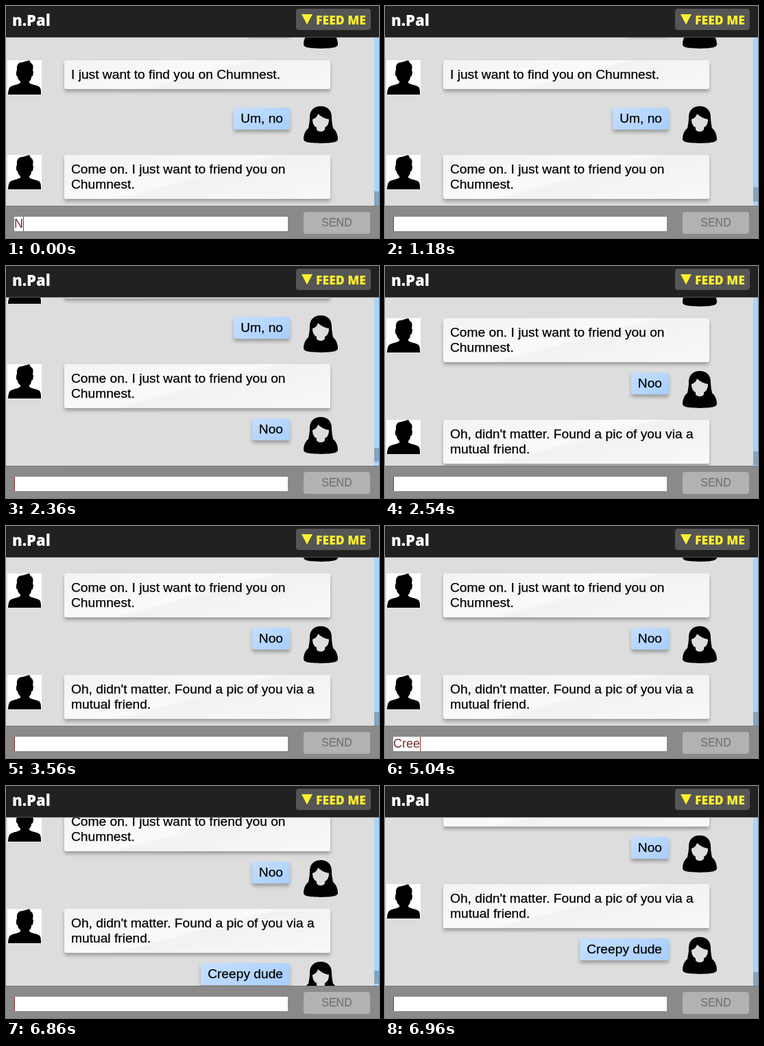
Animation, 544 px wide and 338 px high, one loop 6.98 s. Source, as an HTML page:

```html
<!DOCTYPE html>
<html lang="en">
<head>
<meta charset="utf-8">
<title>Chat</title>
<style>
html, body { margin: 0; width: 100%; height: 100%; overflow: hidden; }
#stage { position: relative; width: 544px; height: 338px; overflow: hidden; background: #ddd;
  font-family: "Liberation Sans", Arial, sans-serif; }
#stage * { position: absolute; box-sizing: border-box; white-space: nowrap; }
#chat { left: 0; top: 45px; width: 544px; height: 246px; overflow: hidden; }
#log { left: 0; top: -45px; width: 537px; height: 700px; }
#track { left: 537px; top: 0; width: 7px; height: 246px; background: #a8d4fc; }
#thumb { left: 0; width: 7px; background: #80a5c4; }
#stage .bubble { border-radius: 3px; font-size: 19.2px; line-height: 22px; color: #000;
  -webkit-text-stroke: .25px; box-shadow: 0 4px 5px rgba(0, 0, 0, .28); }
#stage .bot { left: 85px; width: 388px; padding: 10px; white-space: normal;
  background: linear-gradient(165deg, #f3f3f3, #fafafa 48%, #f2f2f2 52%, #f8f8f8); }
#stage .me { right: 123px; padding: 5px 10px;
  background: linear-gradient(150deg, #c6dffe, #a6cefe); }
header { left: 0; top: 0; width: 544px; height: 45px; background: #212121; box-shadow: 0 1px 0 #555; }
header * { font: 800 22px/30px "Open Sans", sans-serif; }
#name { left: 9px; top: 5px; color: #fff; }
#feed { left: 423px; top: 4px; width: 109px; height: 31px; border-radius: 4px; background: #555; }
#feed span { left: 29px; top: 1px; font-size: 17.6px; color: #fff030; }
#feed svg { left: 8px; top: 8px; fill: #fff030; }
footer { left: 0; top: 291px; width: 544px; height: 47px; background: #8a8a8a; border-top: 1px solid #777; }
#field { left: 12px; top: 15px; width: 399px; height: 21px; background: #fff; }
#typed { left: 0; top: 0; height: 21px; font-size: 18px; line-height: 21px; color: #703434; }
#stage #text { position: static; white-space: pre; }
#caret { right: -1px; top: 0; width: 1px; height: 21px; background: #8a3030; }
#send { left: 434px; top: 8px; width: 97px; height: 32px; border-radius: 4px; background: #b2b2b2;
  color: #777; font-size: 16px; line-height: 32px; text-align: center; -webkit-text-stroke: .3px; }
</style>
</head>
<body>
<div id="stage">
  <div id="chat">
    <div id="log"></div>
    <div id="track"><div id="thumb"></div></div>
  </div>
  <header>
    <div id="name">n.Pal</div>
    <div id="feed"><svg width="16" height="15"><path d="M0 0H16L8 15Z"/></svg><span>FEED ME</span></div>
  </header>
  <footer>
    <div id="field"><div id="typed"><span id="text"></span><i id="caret"></i></div></div>
    <div id="send">SEND</div>
  </footer>
</div>
<script>
const LOOP = 6980, VIEW = 246, STEP = 74, BASE_HEIGHT = 2880;
const $ = id => document.getElementById(id);

const man = `<svg style="left:2px;background:#fff" width="50" height="50"><path d="M14 14C13 6 17 3 22 3
  L32 0 34 4C38 6 38 10 37 15L38 17 37 23 35 24C35 28 33 30 32 31V33C36 36 43 36 47 39C49 41 49 45 49 50
  H1C1 45 2 41 4 39C8 36 15 36 19 33V31C17 29 15 27 15 24L13 22V17Z"/></svg>`;
const woman = `<svg style="left:434px" width="50" height="54"><path fill-rule="evenodd" d="
  M25 0C36 0 41 7 41 16C41 22 42 27 43 32C47 35 50 41 50 48C50 50 48 51 46 52C36 54.5 14 54.5 4 52
  C2 51 0 50 0 48C0 41 3 35 7 32C8 27 9 22 9 16C9 7 14 0 25 0Z
  M13 19C17 18 20 15 21 11C25 15 31 18 37 19C37 25 35 29 31 31V34C29 38 21 38 19 34V31C15 29 13 25 13 19Z"/></svg>`;

// [top, sender, text]
const messages = [
  [8, "me", "Nah."],
  [79, "bot", "I just want to find you on Chumnest."],
  [146, "me", "Um, no"],
  [217, "bot", "Come on. I just want to friend you on Chumnest."],
  [294, "me", "Noo"],
  [365, "bot", "Oh, didn't matter. Found a pic of you via a mutual friend."],
  [442, "me", "Creepy dude"]
];
$("log").innerHTML = messages.map(([top, who, text]) =>
  `<div style="top:${top}px;left:0;width:537px">${who === "me" ? woman : man}
   <div class="bubble ${who}" style="top:${who === "me" ? 2 : 0}px">${text}</div></div>`).join("");

// Each message is added first, then scrolled into view.
const scrolls = [{ add: 1180, go: 1217 }, { add: 2360, go: 2380 }, { add: 6760, go: 6760 }];
const drafts = [
  { word: "Noo", keys: [0, 540, 760], sent: 1180 },
  { word: "Creepy dude", keys: [4540, 4740, 4880, 5040, 5260, 5400, 5600, 5760, 5860, 6280, 6560], sent: 6760 }
];

const ease = (t, start) => {
  const p = Math.min(1, Math.max(0, (t - start) / 200));
  return .5 - Math.cos(Math.PI * p) / 2;
};

function draw(t) {
  const shift = scrolls.reduce((sum, s) => sum + STEP * ease(t, s.go), 0);
  const height = BASE_HEIGHT + STEP * scrolls.filter(s => t >= s.add).length;
  $("log").style.transform = `translateY(${-Math.round(shift)}px)`;
  $("thumb").style.top = (BASE_HEIGHT - VIEW + shift) * VIEW / height + "px";
  $("thumb").style.height = VIEW * VIEW / height + "px";

  const draft = drafts.find(d => t < d.sent);
  $("text").textContent = draft ? draft.word.slice(0, draft.keys.filter(k => t >= k).length) : "";
  const idle = t >= 1160 && t < 4540;
  $("caret").style.opacity = idle && Math.floor((t - 1160) / 600) % 2 ? 0 : 1;
}

const began = performance.now();
function tick() {
  draw((performance.now() - began) % LOOP);
  requestAnimationFrame(tick);
}
tick();
</script>
</body>
</html>
```
